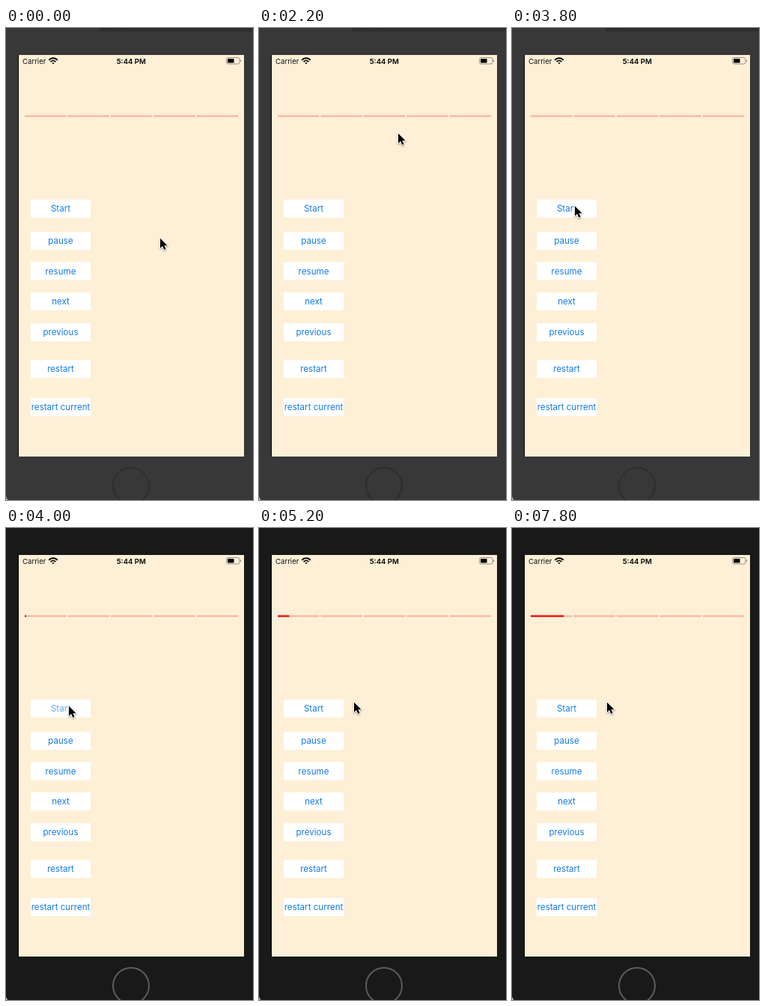
An HTML page with a canvas for the animation above (8000 ms loop, 330 by 630 pixels).

```html
<!DOCTYPE html>
<html lang="en">
<head>
<meta charset="utf-8">
<title>Segmented progress bar</title>
<style>
html, body { margin: 0; width: 100%; height: 100%; overflow: hidden; background: #383838; }
canvas { display: block; width: 330px; height: 630px; }
</style>
</head>
<body>
<canvas id="stage"></canvas>
<script>
const LOOP = 8000, STEP = 200;
const CLICK = 4000, BAR_START = 3820, SEGMENT_MS = 5000;
const FONT = 'Inter, "Liberation Sans", sans-serif';
const BUTTONS = [
  ['Start', 241], ['pause', 284], ['resume', 324.5], ['next', 365],
  ['previous', 406], ['restart', 455], ['restart current', 506]
];
// Pointer positions: time, x, y
const PATH = [
  [0, 206, 280], [200, 201, 178], [400, 195, 123], [2000, 195, 123],
  [2200, 186, 140], [2400, 140, 190], [2600, 96, 232], [2800, 78, 244],
  [3000, 71, 252], [3200, 75, 248], [3400, 80, 241], [3600, 84, 237],
  [4400, 84, 237], [4600, 96, 236], [4800, 115, 233], [5000, 127, 232]
];

const canvas = document.getElementById('stage');
const ratio = window.devicePixelRatio || 1;
canvas.width = 330 * ratio;
canvas.height = 630 * ratio;
const ctx = canvas.getContext('2d');
ctx.scale(ratio, ratio);

function rect(x, y, w, h, color) {
  ctx.fillStyle = color;
  ctx.fillRect(x, y, w, h);
}

function rounded(x, y, w, h, r) {
  ctx.beginPath();
  ctx.roundRect(x, y, w, h, r);
}

function text(label, x, y, size, color, align = 'center', weight = 400) {
  ctx.font = `${weight} ${size}px ${FONT}`;
  ctx.textAlign = align;
  ctx.textBaseline = 'alphabetic';
  ctx.fillStyle = color;
  ctx.fillText(label, x, y);
}

function pointerAt(t) {
  const i = PATH.findLastIndex(p => p[0] <= t);
  const [t0, x0, y0] = PATH[i];
  const [t1, x1, y1] = PATH[i + 1] || [LOOP, x0, y0];
  const k = (t - t0) / (t1 - t0);
  return [x0 + (x1 - x0) * k, y0 + (y1 - y0) * k];
}

function drawDevice(active) {
  rect(0, 0, 330, 630, active ? '#191919' : '#383838');
  if (!active) {
    const shade = ctx.createLinearGradient(0, 0, 0, 7);
    shade.addColorStop(0, 'rgba(0,0,0,.3)');
    shade.addColorStop(1, 'rgba(0,0,0,0)');
    rect(125, 0, 205, 7, shade);
  }
  ctx.fillStyle = '#b8b8b8';
  ctx.beginPath();
  ctx.moveTo(0, 625);
  ctx.quadraticCurveTo(0.8, 628, 2.5, 630);
  ctx.lineTo(0, 630);
  ctx.fill();

  ctx.strokeStyle = active ? '#5c5c5c' : '#2b2b2b';
  ctx.lineWidth = active ? 2 : 1.6;
  ctx.beginPath();
  ctx.arc(167, 611, 24, 0, Math.PI * 2);
  ctx.stroke();

  rect(16, 36, 1, 536, '#000');
  rect(17, 36, 301, 536, '#fef0d7');
}

function drawStatusBar() {
  text('Carrier', 22, 47.7, 9.6, '#111', 'left');
  text('5:44 PM', 167.3, 47.7, 9.6, '#000', 'center', 600);

  ctx.strokeStyle = '#000';
  ctx.lineWidth = 1.9;
  for (const r of [1.2, 4.6, 7.9]) {
    ctx.beginPath();
    ctx.arc(63, 48.2, r, -Math.PI * 0.76, -Math.PI * 0.24);
    ctx.stroke();
  }

  ctx.strokeStyle = '#8b8478';
  ctx.lineWidth = 0.9;
  rounded(294.5, 39.5, 17.5, 8.5, 2.3);
  ctx.stroke();
  ctx.fillStyle = '#000';
  rounded(296, 41, 8.6, 5.5, 1);
  ctx.fill();
  rect(313, 42.5, 1, 2.5, '#8b8478');
}

function drawProgress(t) {
  const width = 55.4;
  for (let i = 0; i < 5; i++) rect(25 + i * 57.45, 116.4, width, 2.4, '#fbb7a5');
  const part = Math.max(0, (t - BAR_START) / SEGMENT_MS);
  rect(25, 116.4, width * part, 2.4, '#e51a12');
}

function drawButtons(t) {
  for (const [label, y] of BUTTONS) {
    rect(33, y - 12, 80, 24, '#fff');
    ctx.globalAlpha = label === 'Start' && t === CLICK ? 0.65 : 1;
    text(label, 73, y + 4.2, 11.6, '#147be5');
    ctx.globalAlpha = 1;
  }
}

function drawPointer([x, y]) {
  ctx.save();
  ctx.translate(x, y);
  const arrow = new Path2D('M0 .8V14L3.1 11.1 5.3 16 7.6 15 5.4 10.2H9.6Z');
  ctx.lineJoin = 'round';
  ctx.lineWidth = 2;
  ctx.strokeStyle = '#fff';
  ctx.shadowColor = 'rgba(0,0,0,.4)';
  ctx.shadowBlur = 2 * ratio;
  ctx.shadowOffsetY = ratio;
  ctx.stroke(arrow);
  ctx.shadowColor = 'transparent';
  ctx.fillStyle = '#000';
  ctx.fill(arrow);
  ctx.restore();
}

function draw(now) {
  const t = Math.floor((now % LOOP) / STEP) * STEP;
  drawDevice(t >= CLICK);
  drawStatusBar();
  drawProgress(t);
  drawButtons(t);
  drawPointer(pointerAt(t));
}

const start = performance.now();
function tick() {
  draw(performance.now() - start);
  requestAnimationFrame(tick);
}
tick();
</script>
</body>
</html>
```
